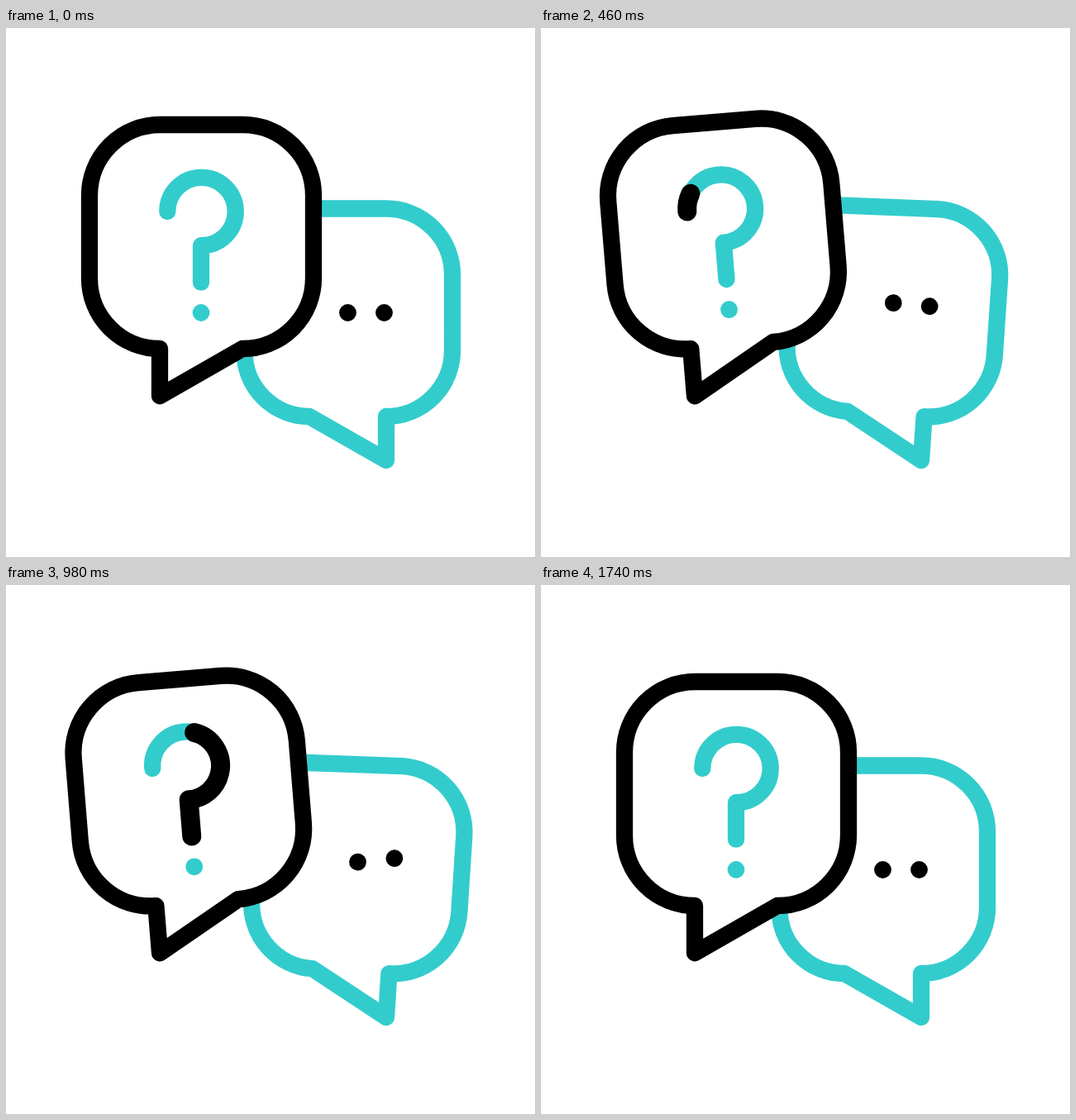
An HTML page with a canvas for the animation above (2420 ms loop, 640 by 640 pixels).

```html
<!DOCTYPE html>
<html lang="en">
<head>
<meta charset="utf-8">
<title>Question and answer</title>
<style>
  html, body { margin: 0; width: 100%; height: 100%; overflow: hidden; background: #fff; }
  canvas { display: block; }
</style>
</head>
<body>
<canvas id="stage" width="640" height="640"></canvas>
<script>
const ctx = document.getElementById('stage').getContext('2d');
const TEAL = '#33cccc', BLACK = '#000', LINE = 20.3, INK = 23;
const LOOP = 2420, STEP = 20;

// Smooth progress from 0 to 1 between two times.
function ease(t, from, to) {
  const p = Math.min(1, Math.max(0, (t - from) / (to - from)));
  return p * p * (3 - 2 * p);
}

// Lean to the peak, sag a little while held, swing past upright, settle.
function swing(t, { peak, rise, sag, back, turn, over, rest }) {
  const held = ease(t, rise, 650) - ease(t, 650, back);
  return peak * (ease(t, 0, rise) - sag * held)
    + (over - peak) * ease(t, back, turn)
    - over * ease(t, turn, rest);
}

const ask = { peak: -4.85, rise: 340, sag: 0.07, back: 950, turn: 1230, over: 2.1, rest: 1390 };
const reply = { peak: 4.35, rise: 300, sag: 0.25, back: 920, turn: 1220, over: -2, rest: 1740 };

// Height of a dot that hops at two moments.
function hop(t, first, second) {
  const bump = mid => Math.exp(-(((t - mid) / 207) ** 2));
  return 13.5 * (bump(first) + bump(second));
}

function turned(x, y, deg, draw) {
  ctx.save();
  ctx.translate(x, y);
  ctx.rotate(deg * Math.PI / 180);
  ctx.translate(-x, -y);
  draw();
  ctx.restore();
}

function stroke(color, width) {
  ctx.strokeStyle = color;
  ctx.lineWidth = width;
  ctx.stroke();
}

function dot(x, y, color) {
  ctx.beginPath();
  ctx.arc(x, y, 10.4, 0, 2 * Math.PI);
  ctx.fillStyle = color;
  ctx.fill();
}

function replyBubble(t, angle) {
  // The covered end of the top edge droops while the bubble leans.
  const droop = 3.8 * Math.min(1, Math.abs(angle) / 1.5);
  ctx.beginPath();
  ctx.moveTo(325, 218.5 + droop);
  ctx.lineTo(460, 218.5);
  ctx.arcTo(540, 218.5, 540, 400, 80);
  ctx.arcTo(540, 470, 460, 470, 80);
  ctx.lineTo(460, 470);
  ctx.lineTo(460, 523);
  ctx.lineTo(367, 470);
  ctx.arcTo(288.5, 470, 288.5, 380, 78.5);
  ctx.lineTo(288.5, 375);
  stroke(TEAL, LINE);
  dot(413.5, 344.5 - hop(t, 590, 1160), BLACK);
  dot(457.5, 344.5 - hop(t, 610, 975), BLACK);
}

// Part of the question mark: three quarters of a circle, then a stem.
function mark(from, to, color, width) {
  if (to <= from) return;
  const x = 236.5, y = 222, r = 41.2, stem = 44.5;
  const arc = 1.5 * Math.PI * r;
  const a = from * (arc + stem), b = to * (arc + stem);
  ctx.beginPath();
  if (a < arc) ctx.arc(x, y, r, Math.PI + a / r, Math.PI + Math.min(b, arc) / r);
  if (b > arc) {
    ctx.lineTo(236, y + r + Math.max(0, a - arc));
    ctx.lineTo(236, y + r + b - arc);
  }
  stroke(color, width);
}

function askBubble(t) {
  ctx.beginPath();
  ctx.moveTo(186, 445.3);
  ctx.lineTo(186, 388);
  ctx.arcTo(101, 388, 101, 300, 85);
  ctx.arcTo(101, 117, 200, 117, 85.5);
  ctx.arcTo(372, 117, 372, 210, 85.5);
  ctx.arcTo(372, 388, 286, 388, 85.5);
  ctx.lineTo(286, 388);
  ctx.closePath();
  ctx.fillStyle = '#fff';
  ctx.fill();
  stroke(BLACK, LINE);
  mark(0, 1, TEAL, LINE);
  dot(236, 344.5, TEAL);
  mark(ease(t, 768, 1325), ease(t, 355, 912), BLACK, INK);
}

function render(now) {
  const t = Math.floor((now % LOOP) / STEP) * STEP;
  ctx.fillStyle = '#fff';
  ctx.fillRect(0, 0, 640, 640);
  ctx.lineCap = ctx.lineJoin = 'round';
  const lean = swing(t, reply);
  turned(460, 523, lean, () => replyBubble(t, lean));
  turned(186, 445, swing(t, ask), () => askBubble(t));
}

let start;
function tick(now) {
  if (start === undefined) start = now;
  render(now - start);
  requestAnimationFrame(tick);
}
render(0);
requestAnimationFrame(tick);
</script>
</body>
</html>
```
